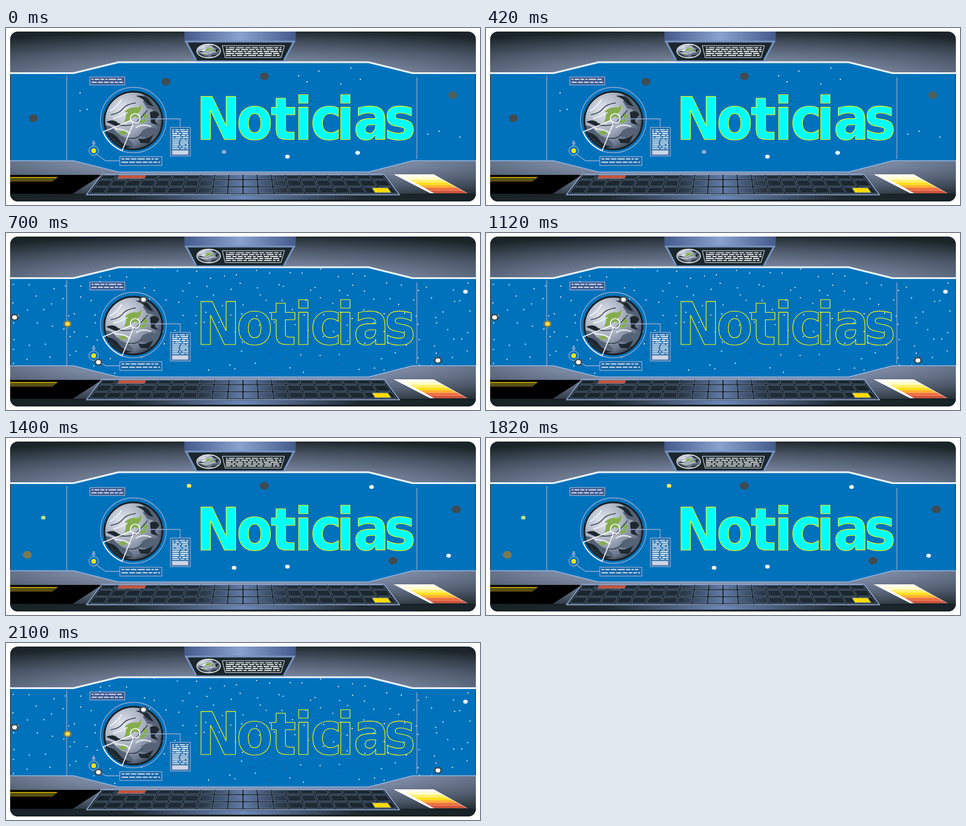
An HTML page that plays this animation: 800 px wide and 300 px high, repeating every 2800 ms.

```html
<!DOCTYPE html>
<html lang="es">
<head>
<meta charset="utf-8">
<title>Noticias</title>
<style>
html, body { margin: 0; width: 100%; height: 100%; overflow: hidden; background: #fff; }
svg { display: block; width: 800px; height: 300px; }
.title { font: 900 99px "DejaVu Sans Condensed", Roboto, sans-serif; stroke: #ff0; stroke-width: 1.1; fill: #0ff; }
.thin { fill: none; stroke: #8fa8cf; stroke-width: 1.3; }
.white { fill: none; stroke: #fff; stroke-width: 1.6; }
</style>
</head>
<body>
<svg viewBox="0 0 800 300">
  <defs>
    <clipPath id="card"><rect x="7" y="6" width="786" height="288" rx="13"/></clipPath>
    <clipPath id="disc"><circle r="49"/></clipPath>
    <clipPath id="window"><path d="M7 77H114L190 59H612L686 77H793V225H686L612 244H190L114 225H7Z"/></clipPath>
    <radialGradient id="roof" gradientUnits="userSpaceOnUse" cx="0" cy="0" r="1" gradientTransform="translate(400 90) scale(700 88)">
      <stop offset="0" stop-color="#98a4bc"/><stop offset=".4" stop-color="#76839b"/>
      <stop offset=".72" stop-color="#4a5667"/><stop offset="1" stop-color="#1b2529"/>
    </radialGradient>
    <radialGradient id="floor" gradientUnits="userSpaceOnUse" cx="0" cy="0" r="1" gradientTransform="translate(400 220) scale(680 75)">
      <stop offset="0" stop-color="#98a4bc"/><stop offset=".45" stop-color="#79869f"/>
      <stop offset=".75" stop-color="#4d596a"/><stop offset="1" stop-color="#222c32"/>
    </radialGradient>
    <linearGradient id="bar">
      <stop offset="0" stop-color="#445a8b"/><stop offset=".5" stop-color="#8aa2cf"/><stop offset="1" stop-color="#445a8b"/>
    </linearGradient>
    <linearGradient id="base">
      <stop offset="0" stop-color="#182226"/><stop offset=".25" stop-color="#1e292f"/><stop offset=".5" stop-color="#6c87b8"/>
      <stop offset=".75" stop-color="#1e292f"/><stop offset="1" stop-color="#182226"/>
    </linearGradient>
    <linearGradient id="keys" gradientUnits="userSpaceOnUse" x1="136" x2="664" y1="0" y2="0">
      <stop offset="0" stop-color="#18232a"/><stop offset=".35" stop-color="#202c37"/><stop offset=".5" stop-color="#627caa"/>
      <stop offset=".65" stop-color="#202c37"/><stop offset="1" stop-color="#18232a"/>
    </linearGradient>
    <radialGradient id="ball" cx=".32" cy=".32" r=".78">
      <stop offset="0" stop-color="#e4e8ef"/><stop offset=".45" stop-color="#a9b1c1"/>
      <stop offset=".8" stop-color="#6b778e"/><stop offset="1" stop-color="#2b3540"/>
    </radialGradient>
    <g id="globe">
      <circle r="49" fill="url(#ball)"/>
      <g clip-path="url(#disc)">
        <path fill="#566276" d="M10-50Q40-44 50-16L40-8Q34-22 24-20L16-32 22-38ZM-48 8Q-36 8-30 18L-20 26Q-8 30 0 40L-6 50H-30ZM14 18Q28 8 38 14L50 6V28L32 36Q24 26 12 28Z"/>
        <path fill="#1e282f" d="M4-42Q18-44 26-36L34-24Q24-26 20-32T4-42ZM-46 2Q-34-4-26 4L-16 8-28 10ZM28-14Q38-20 44-10L36 0 42 8 30 4ZM-44 20Q-32 20-24 32T0 44L-14 46Q-32 38-44 20ZM8 30Q20 34 34 24L26 38H12Z"/>
        <path fill="#86ad4e" d="M-14-16Q-4-25 8-22L14-28 12-17 6-11 12-4 2-7-8 0-16 3Q-10-8-14-16ZM16-14L24-10 22 0 14 6 10 1 17-5ZM-26 20L-14 15-10 20-18 25Z"/>
        <path fill="none" stroke="#eef1f6" stroke-width="2" d="M-40-16Q-26-24-20-36M-34-4Q-18-8-10-14M4 12Q16 4 30 10M-32 14Q-14 14-5 22"/>
        <path fill="none" stroke="#36414d" stroke-width="1.5" d="M-38-10Q-24-12-18-20T4-30M-20 8Q-2 10 6 2T24-18M-10 30Q8 32 14 22"/>
      </g>
      <circle r="49" fill="none" stroke="#172126" stroke-width="3"/>
    </g>
  </defs>

  <g clip-path="url(#card)">
    <path fill="url(#roof)" d="M7 6H793V80H7Z"/>
    <path fill="url(#floor)" d="M7 222H793V294H7Z"/>
    <path fill="#0072bc" d="M7 77H114L190 59H612L686 77H793V225H686L612 244H190L114 225H7Z"/>
    <path fill="none" stroke="#141d22" d="M7.5 77V225M792.5 77V225"/>

    <g id="sky" clip-path="url(#window)"></g>

    <g id="hud">
      <path class="thin" d="M102.5 80V225M693.5 84V222"/>
      <circle class="thin" cx="215" cy="156" r="55.5"/>
      <use href="#globe" x="215" y="157"/>
      <path class="thin" d="M226 154H294V168M151 213L168 225H192"/>
      <circle class="white" cx="218" cy="153" r="8"/>
      <path class="white" d="M211 157L164 176Q173 198 196 208L215 161"/>
      <circle class="thin" cx="148" cy="208" r="8"/>
      <circle cx="148" cy="208" r="4" fill="#ffe000"/>
      <path fill="#7f9bc8" d="M146 191H150V195H152L148 200 144 195H146Z"/>
    </g>

    <g id="front" clip-path="url(#window)"></g>

    <text id="word" class="title" y="188.500" x="321 389 447 486.500 514 557.500 586.500 638.500">Noticias</text>

    <path fill="none" stroke="#eaf2fb" stroke-width="3" d="M7 76.5H114L190 58H612L686 76.5H793"/>
    <path fill="none" stroke="#9bb4dc" stroke-width="1.4" d="M7 225H114L190 244H612L686 225H793"/>

    <path fill="url(#bar)" d="M301 6H489V22H301Z"/>
    <path fill="#1b272c" d="M303 22H487L470 56H320Z"/>
    <path fill="none" stroke="#7893c2" stroke-width="3" d="M302 23H488M304 23L321 55M486 23L469 55"/>
    <path fill="none" stroke="#7893c2" stroke-width="2" d="M320 56H470"/>
    <g id="lid">
      <use href="#globe" transform="translate(342 39) scale(.4 .23)"/>
      <ellipse cx="342" cy="39" rx="20" ry="11.5" fill="none" stroke="#fff" stroke-width="1.3"/>
      <path fill="none" stroke="#e9eef8" d="M365 30H470L464 50H370Z"/>
    </g>

    <path d="M7 249H162L111 282H7Z"/>
    <path fill="#b89a10" d="M7 252.500H87L85 255H7Z"/>
    <path fill="#7d8a18" d="M7 256H84L82 257.500H7Z"/>
    <path fill="#94701c" d="M7 258.500H80L79 260H7Z"/>
    <path fill="#182226" d="M7 281H793V294H7Z"/>
    <path fill="url(#base)" d="M7 284H793V291H7Z"/>
    <path fill="#111a20" d="M162 248H638L664 283H136Z"/>
    <g id="board"></g>
    <path fill="none" stroke="#8ba1c8" stroke-width="1.8" d="M162 248L136 282.500H664L638 248Z"/>
    <g id="slope"></g>
  </g>
</svg>
<script>
const $ = id => document.getElementById(id);
const LOOP = { duration: 2800, iterations: Infinity };

function add(parent, tag, attrs) {
  const el = document.createElementNS("http://www.w3.org/2000/svg", tag);
  for (const k in attrs) el.setAttribute(k, attrs[k]);
  return parent.appendChild(el);
}

// One value per quarter of the loop, held until the next.
function hold(el, prop, values) {
  const steps = [...values, values[0]].map((v, i) => ({ [prop]: v, offset: i / 4, easing: "step-end" }));
  el.animate(steps, LOOP);
}

let seed = 11;
const rnd = () => (seed = seed * 16807 % 2147483647) / 2147483647;

function dot(parent, x, y, r, fill) {
  add(parent, "ellipse", { cx: x, cy: y, rx: r, ry: r * .86, fill });
}

function glow(parent, x, y, rim, core) {
  dot(parent, x, y, 7, rim);
  dot(parent, x, y, 4, core);
}

// Rows of broken white strokes that stand for unreadable text.
function lines(parent, x, y, w, rows, gap) {
  let d = "";
  for (let r = 0; r < rows; r++) {
    for (let p = 0; p < w - 2;) {
      const n = Math.min(3 + rnd() * 11, w - p);
      d += `M${x + p} ${y + r * gap}h${n}`;
      p += n + 2;
    }
  }
  add(parent, "path", { d, stroke: "#fff", "stroke-width": 1.7, fill: "none" });
}

function panel(x, y, w, h, fill, rows, gap) {
  add($("hud"), "rect", { x, y, width: w, height: h, fill, stroke: "#8fa8cf", "stroke-width": 1.3 });
  lines($("hud"), x + 3, y + 4, w - 6, rows, gap);
}

panel(141.5, 83, 59, 13.5, "#3f5b91", 2, 5);
panel(192, 218, 71, 15, "#1768aa", 2, 5.5);
panel(277.5, 168.5, 33.5, 48.5, "#1768aa", 11, 3.2);
add($("hud"), "rect", { x: 280, y: 207, width: 28, height: 8, fill: "#ccd5e5", stroke: "#5878aa" });
lines($("lid"), 371, 33.5, 94, 5, 3.2);

// Sky: three sets of stars and drifting rocks.
const ROCK = "#414b50", WHITE = "#fff";
const skies = [0, 1, 2].map(() => add($("sky"), "g", {}));

[[46, 153, ROCK], [270, 91, ROCK], [436, 82, ROCK], [754, 114, "#4c6058"]]
  .forEach(([x, y, c]) => dot(skies[0], x, y, 7.5, c));
[[368, 210, "#8fa9d8"], [475, 218, WHITE], [593.5, 211.5, WHITE]]
  .forEach(([x, y, c]) => dot(skies[0], x, y, 3.8, c));
[[125, 110], [125, 140], [137, 138], [494, 81], [508, 91], [528, 73], [565, 95],
 [582, 68], [598, 87], [712, 180], [731, 175], [766, 185]]
  .forEach(([x, y]) => dot(skies[0], x, y, 1.1, WHITE));
dot(skies[0], 124, 163, 1.1, "#304f68");

for (let y = 68; y < 240; y += 23) {
  for (let x = 18; x < 790; x += 27) {
    const sx = x + rnd() * 22 - 11, sy = y + rnd() * 18 - 9;
    const dim = sy > 165 && sx > 260 && sx < 620 && rnd() < .55;
    dot(skies[1], sx, sy, 1.1, dim ? "#304f68" : WHITE);
  }
}

[[436, 81, ROCK], [760, 121, ROCK], [653, 208, ROCK], [36, 198, "#7b7856"]]
  .forEach(([x, y, c]) => dot(skies[2], x, y, 7.5, c));
[[309, 81, "#ffe94a"], [617, 83, WHITE], [747, 199.5, WHITE], [385, 220, WHITE],
 [475, 218, WHITE], [63, 135, "#b4df91"]]
  .forEach(([x, y, c]) => dot(skies[2], x, y, 3.8, c));

const rocks = add($("front"), "g", {});
[[14.5, 143], [232, 113], [156, 219], [729, 216]].forEach(([x, y]) => glow(rocks, x, y, ROCK, WHITE));
glow(rocks, 104, 154, "#817b50", "#f0dc50");
dot(rocks, 775.5, 99.5, 3.8, WHITE);

// Keyboard in perspective, spreading away from x = 400.
const COLS = 20;
const px = (c, y) => 400 + (c / COLS - .5) * (472 + (y - 248) * 1.49);
function key(c0, c1, y0, y1, fill) {
  const d = `M${px(c0 + .05, y0)} ${y0}L${px(c1 - .05, y0)} ${y0} ${px(c1 - .05, y1)} ${y1} ${px(c0 + .05, y1)} ${y1}Z`;
  add($("board"), "path", { d, fill, stroke: "#6d809f", "stroke-width": .8 });
}
[[249.5, 256], [258, 268], [270, 280]].forEach(([a, b]) => {
  for (let c = 0; c < COLS; c++) key(c, c + 1, a, b, "url(#keys)");
});
key(1.15, 3.15, 249.5, 255, "#c65338");
key(18.55, 19.7, 271, 279, "#ffdc00");

// Sloping colour panel on the right.
add($("slope"), "path", { d: "M654 248H722L779 280H716Z", fill: "#fff" });
["#fffef2", "#fffbc8", "#fff06a", "#ffdf1c", "#ffae2c", "#ee7043", "#d2533a"].forEach((fill, i) => {
  const h = 32 / 7, y = 248 + i * h;
  const l = 665 + i * 8.2, r = 718 + i * 8.6;
  add($("slope"), "path", { d: `M${l} ${y}H${r}L${r + 8.6} ${y + h}H${l + 8.2}Z`, fill });
});

hold(skies[0], "opacity", [1, 0, 0, 0]);
hold(skies[1], "opacity", [0, 1, 0, 1]);
hold(skies[2], "opacity", [0, 0, 1, 0]);
hold(rocks, "opacity", [0, 1, 0, 1]);
hold($("word"), "fillOpacity", [1, 0, 1, 0]);
["hud", "word", "lid"].forEach(id =>
  hold($(id), "transform", ["none", "none", "translateY(1px)", "none"]));
</script>
</body>
</html>
```
